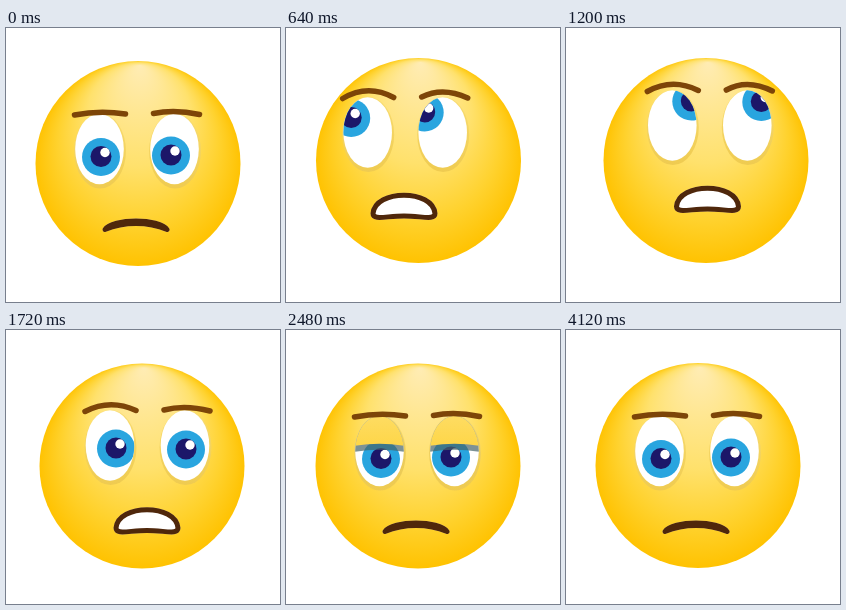
Recreate the animation shown at these times as an HTML page with a canvas. Size 274 by 274 pixels, loop 4.16 s.

```html
<!DOCTYPE html>
<html lang="en">
<head>
<meta charset="utf-8">
<title>Eye roll</title>
<style>
  html, body { margin: 0; height: 100%; overflow: hidden; background: #fff; }
  canvas { display: block; width: 100vw; height: 100vh; }
</style>
</head>
<body>
<canvas></canvas>
<script>
const STAGE = 274, LOOP = 4160, STEP = 40, REST = 4120;
const HEAD_R = 102.5, EYE_GAP = 75, EYE_RX = 24.3, EYE_RY = 35.3;
const canvas = document.querySelector('canvas');
const ctx = canvas.getContext('2d');

// time, head x y, left eye x y, left gaze x y, right gaze x y, brow arches, mouth x y, mouth opening
const calm = [93.5, 121, 1.5, 8, -3.5, 6.5, 39, 40, 130, 193, 0];
const up = [132.5, 132.5, 81.7, 104.5, -16.5, -14.5, -18, -20, 49, 46, 118, 167.5, 1];
const poses = [
  [0, 132, 135.5, ...calm],
  [600, ...up],
  [640, ...up],
  [1200, 140, 132.5, 106.3, 97.5, 19, -24, 14, -23.5, 48, 47, 141.5, 160.5, 1],
  [1720, 136, 136, 104, 115.5, 6, 3, 1, 4, 47, 41, 141, 180, 1],
  [2240, 132, 136, ...calm]
];
// time, eyelid closure
const lids = [[1800, 0], [2240, 0.44], [2480, 0.5], [3180, 0.5], [3520, 1], [3960, 0]];

const lerp = (a, b, t) => a + (b - a) * t;

// Monotone cubic curve through column c of the keys
function sample(keys, c, t) {
  const last = keys.length - 1;
  if (t <= keys[0][0]) return keys[0][c];
  if (t >= keys[last][0]) return keys[last][c];
  const i = keys.findIndex(k => k[0] > t) - 1;
  const slope = j => (keys[j + 1][c] - keys[j][c]) / (keys[j + 1][0] - keys[j][0]);
  const tangent = j => {
    if (j === 0 || j === last) return 0;
    const a = slope(j - 1), b = slope(j);
    return a * b <= 0 ? 0 : 2 * a * b / (a + b);
  };
  const span = keys[i + 1][0] - keys[i][0], u = (t - keys[i][0]) / span, v = 1 - u;
  return keys[i][c] * v * v * (1 + 2 * u) + keys[i + 1][c] * u * u * (3 - 2 * u)
    + span * u * v * (tangent(i) * v - tangent(i + 1) * u);
}

function ellipse(x, y, rx, ry, fill) {
  ctx.beginPath();
  ctx.ellipse(x, y, rx, ry, 0, 0, Math.PI * 2);
  ctx.fillStyle = fill;
  ctx.fill();
}

const disc = (x, y, r, fill) => ellipse(x, y, r, r, fill);

function gradient(g, ...stops) {
  stops.forEach(([at, color]) => g.addColorStop(at, color));
  return g;
}

function drawHead(x, y) {
  disc(x, y, HEAD_R, gradient(ctx.createRadialGradient(x + 2, y - 98, 0, x, y, HEAD_R + 1),
    [0, '#ffecb4'], [0.5, '#ffe16c'], [0.78, '#ffd22e'], [1, '#ffc200']));
}

function drawEye(x, y, gazeX, gazeY, closed) {
  const squeeze = Math.max(0, closed * 2 - 1);
  ellipse(x + 0.5, y + 2, 26, 37.5, gradient(ctx.createLinearGradient(0, y - 36, 0, y + 40),
    [0, '#f8dc72'], [1, '#efcb50']));
  ellipse(x + 0.5, y + 3, 25.5, 38, gradient(ctx.createLinearGradient(0, y - 20, 0, y + 41),
    [0, `rgba(160,140,55,${closed * 0.3})`], [1, `rgba(125,110,50,${squeeze * 0.75})`]));

  ctx.save();
  ellipse(x, y, EYE_RX, EYE_RY, '#fff');
  ctx.clip();
  const irisX = x + gazeX, irisY = y + gazeY;
  disc(irisX, irisY, 19, '#29a5df');
  disc(irisX, irisY - 0.5, 10.5, '#1c1769');
  disc(irisX + 4, irisY - 4.5, 4.7, '#fff');

  if (closed > 0) {
    const upper = y - EYE_RY + 56 * closed, lower = y + EYE_RY + 1 - 13 * squeeze;
    const bow = lerp(-3, 2.5, squeeze);
    const lid = (edge, far, fill) => {
      ctx.beginPath();
      ctx.moveTo(x - 30, edge - bow);
      ctx.quadraticCurveTo(x, edge + bow, x + 30, edge - bow);
      ctx.lineTo(x + 30, far);
      ctx.lineTo(x - 30, far);
      ctx.fillStyle = fill;
      ctx.fill();
    };
    lid(upper + 6 * Math.min(1, closed * 2), y - 40, 'rgba(70,100,105,0.7)');
    lid(upper, y - 40, gradient(ctx.createLinearGradient(0, y - 35, 0, y + 25),
      [0, '#fedc62'], [1, '#fdd02e']));
    if (squeeze > 0) lid(lower, y + 40, '#fcd22f');
  }
  ctx.restore();
}

function drawBrow(x, y, left, leftY, arch, right, rightY) {
  ctx.beginPath();
  ctx.moveTo(x + left, y + leftY);
  ctx.quadraticCurveTo(x, y - arch, x + right, y + rightY);
  ctx.lineWidth = 5.5;
  ctx.strokeStyle = '#7d4508';
  ctx.stroke();
}

function drawMouth(x, y, open) {
  const mix = (a, b) => lerp(a, b, open);
  const end = mix(8.5, 18), topX = mix(24, 29), topY = mix(-2.8, -6.5);
  const cornerX = mix(25, 31), cornerY = mix(6, 25), midX = mix(14, 18), mid = mix(2.5, 20.5);
  ctx.save();
  ctx.translate(x, y);
  ctx.beginPath();
  ctx.moveTo(-31, end);
  ctx.bezierCurveTo(-topX, topY, topX, topY, 31, end);
  ctx.bezierCurveTo(cornerX, cornerY, midX, mid, 0, mid);
  ctx.bezierCurveTo(-midX, mid, -cornerX, cornerY, -31, end);
  ctx.closePath();
  ctx.lineWidth = 5;
  ctx.strokeStyle = '#ffe9a0';
  ctx.translate(0, 1.5);
  ctx.stroke();
  ctx.translate(0, -1.5);
  ctx.fillStyle = open > 0.05 ? '#fff' : '#4f270b';
  ctx.fill();
  ctx.strokeStyle = '#4f270b';
  ctx.stroke();
  ctx.restore();
}

function draw(time) {
  const t = time >= REST ? 0 : time;
  const [headX, headY, eyeX, eyeY, leftX, leftY, rightX, rightY, archL, archR, mouthX, mouthY, open]
    = poses[0].slice(1).map((_, i) => sample(poses, i + 1, t));
  const closed = sample(lids, 1, t);
  ctx.fillStyle = '#fff';
  ctx.fillRect(0, 0, STAGE, STAGE);
  drawHead(headX, headY);
  drawEye(eyeX, eyeY, leftX, leftY, closed);
  drawEye(eyeX + EYE_GAP, eyeY, rightX, rightY, closed);
  drawBrow(eyeX, eyeY, -25, -34, archL, 26, -35);
  drawBrow(eyeX + EYE_GAP, eyeY, -21, -35.5, archR, 25, -34.5);
  drawMouth(mouthX, mouthY, open);
}

function resize() {
  const ratio = devicePixelRatio || 1;
  canvas.width = innerWidth * ratio;
  canvas.height = innerHeight * ratio;
  ctx.setTransform(canvas.width / STAGE, 0, 0, canvas.height / STAGE, 0, 0);
  ctx.lineCap = ctx.lineJoin = 'round';
}

addEventListener('resize', resize);
resize();
const start = performance.now();
function tick() {
  const time = (performance.now() - start) % LOOP;
  draw(Math.floor(time / STEP) * STEP);
  requestAnimationFrame(tick);
}
tick();
</script>
</body>
</html>
```
